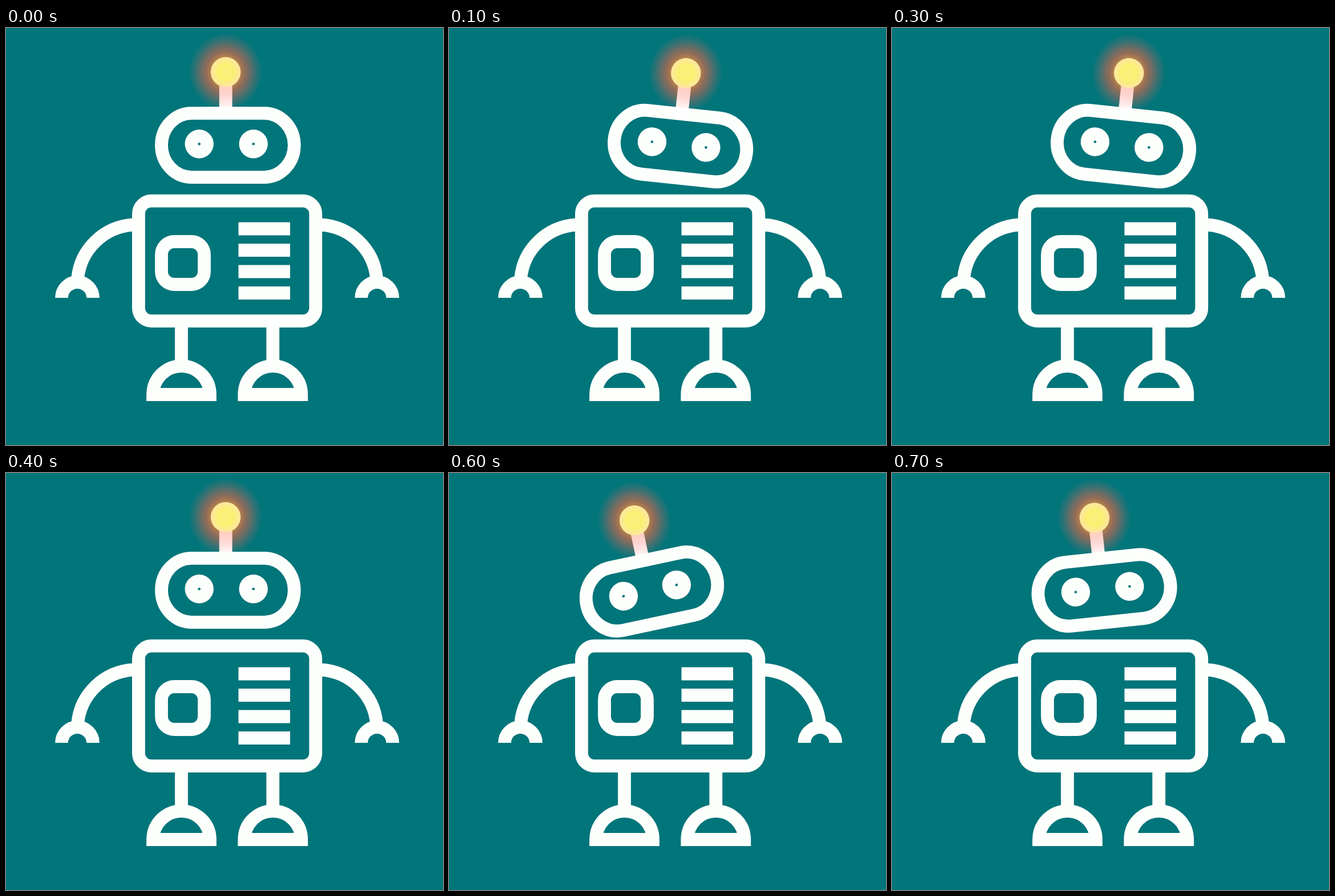
Recreate the animation shown at these times as an HTML page. Size 766 px wide and 731 px high, loop 800 ms.

```html
<!DOCTYPE html>
<html lang="en">
<head>
<meta charset="utf-8">
<title>Robot</title>
<style>
  html, body { margin: 0; width: 100%; height: 100%; overflow: hidden; background: #00757a; }
  svg { display: block; width: 766px; height: 731px; }
  .line { fill: none; stroke: #fdfffc; stroke-width: 22.8; }
  .solid { fill: #fdfffc; }
  .pupil { fill: #00757a; }
</style>
</head>
<body>
<svg viewBox="0 0 766 731">
  <defs>
    <radialGradient id="glow">
      <stop offset=".36" stop-color="#b68a4a"/>
      <stop offset=".43" stop-color="#a9794e"/>
      <stop offset=".52" stop-color="#966c58" stop-opacity=".96"/>
      <stop offset=".64" stop-color="#8f6a5e" stop-opacity=".78"/>
      <stop offset=".78" stop-color="#856c66" stop-opacity=".46"/>
      <stop offset=".92" stop-color="#7a7070" stop-opacity=".16"/>
      <stop offset="1" stop-color="#7a7070" stop-opacity="0"/>
    </radialGradient>
    <radialGradient id="bulb">
      <stop offset="0" stop-color="#f9f07f"/>
      <stop offset=".5" stop-color="#f9f071"/>
      <stop offset=".72" stop-color="#fbec84"/>
      <stop offset="1" stop-color="#ffe6a6"/>
    </radialGradient>
    <linearGradient id="stalk" gradientUnits="userSpaceOnUse" x1="0" y1="100" x2="0" y2="144">
      <stop offset="0" stop-color="#ffcdbb"/>
      <stop offset=".4" stop-color="#ffd5d2"/>
      <stop offset="1" stop-color="#fdfbfa"/>
    </linearGradient>
    <g id="side">
      <path class="line" d="M223 345A104 104 0 0 0 125.7 439"/>
      <path class="line" d="M97.5 473a27.5 27.5 0 0 1 55 0"/>
      <path class="line" d="M307.5 520V590"/>
      <path class="line" d="M257.5 642.5a50 50 0 0 1 100 0z"/>
    </g>
  </defs>

  <use href="#side"/>
  <use href="#side" transform="matrix(-1 0 0 1 775.3 0)"/>
  <rect class="line" x="232.4" y="303.2" width="310.4" height="210.4" rx="22.5"/>
  <rect class="line" x="272.5" y="374.5" width="75" height="75" rx="22.5"/>
  <path class="line" d="M407.5 352h90.5M407.5 389.5h90.5M407.5 427h90.5M407.5 464.5h90.5"/>

  <g id="head">
    <ellipse cx="384.8" cy="77" rx="65.5" ry="69" fill="url(#glow)"/>
    <rect x="373.8" y="95" width="22.8" height="50" fill="url(#stalk)"/>
    <circle cx="385.1" cy="77.2" r="26.2" fill="url(#bulb)"/>
    <rect class="line" x="272.5" y="149.3" width="232.8" height="112.3" rx="53" ry="56"/>
    <circle class="solid" cx="338.7" cy="203.2" r="25.2"/>
    <circle class="solid" cx="433.7" cy="203.2" r="25.2"/>
    <circle class="pupil" cx="338.7" cy="203.2" r="2.3"/>
    <circle class="pupil" cx="433.7" cy="203.2" r="2.3"/>
  </g>
</svg>
<script>
  const head = document.getElementById('head');
  const tilts = [0, 6, 12, 6, 0, -6, -12, -6];
  const hold = 100;
  const start = performance.now();

  function draw(now) {
    const step = Math.floor(Math.max(0, now - start) / hold) % tilts.length;
    head.setAttribute('transform', `rotate(${tilts[step]} 383 365.5)`);
    requestAnimationFrame(draw);
  }
  draw(start);
</script>
</body>
</html>
```
